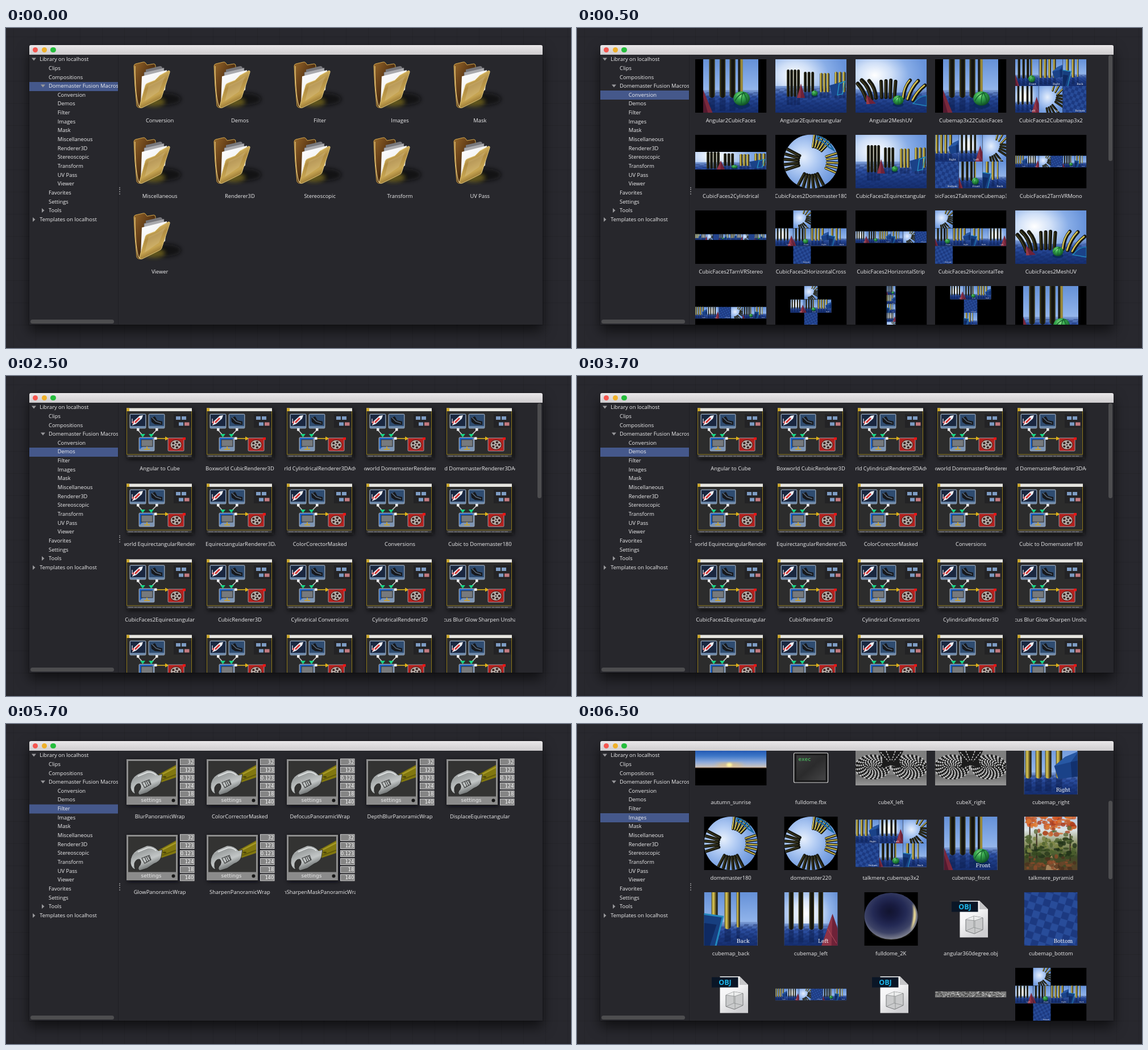
These frames come from a looping animation (994x563 px, 8 s). An HTML page:

```html
<!DOCTYPE html>
<html lang="en">
<head>
<meta charset="utf-8">
<title>Library browser</title>
<style>
html, body { margin: 0; width: 100%; height: 100%; overflow: hidden; background: #28282e; }
#stage {
  position: relative; width: 994px; height: 563px; overflow: hidden;
  font: 9.39px/15.65px "Open Sans", "Noto Sans", sans-serif; color: #efeff0; white-space: nowrap;
  background:
    repeating-linear-gradient(90deg, transparent 0 13px, rgba(0,0,0,.1) 13px 14px, transparent 14px 39px),
    repeating-linear-gradient(transparent 0 15px, rgba(0,0,0,.1) 15px 16px, transparent 16px 39px),
    #28282e;
}
#stage div, #defs, .cell > svg, #side svg { position: absolute; }
#win {
  left: 41px; top: 30px; width: 903px; height: 492px; border-radius: 3px 3px 0 0;
  background: #27272c; box-shadow: 0 11px 22px rgba(0,0,0,.6), 0 0 2px rgba(0,0,0,.6);
}
#bar { left: 0; top: 0; width: 903px; height: 17px; border-radius: 3px 3px 0 0; background: linear-gradient(#e9e7e9, #cfcdcf); }
.dot { top: 3.6px; width: 9.4px; height: 9.4px; border-radius: 50%; }
#side { left: 0; top: 17px; width: 155.5px; height: 475px; overflow: hidden; }
#sel { left: 0; top: 0; width: 156px; height: 15.5px; background: #45588b; animation: pick 8s step-end infinite; }
#split { left: 155.5px; top: 17px; width: 1px; height: 475px; background: #202024; }
#grip { left: 157.5px; top: 250px; width: 0; height: 13px; border-left: 2px dotted #77777a; }
.thumbtrack { background: #4d4d4f; border-radius: 4px; }
.page { left: 157px; top: 17px; width: 746px; height: 475px; overflow: hidden; opacity: 0; }
.cell { width: 125.2px; height: 120px; }
.cell > svg { left: 0; top: 0; overflow: visible; }
.cell div { left: 0; top: 100.6px; width: 125.2px; display: flex; justify-content: center; overflow: hidden; }
@keyframes pick {
  0% { transform: translateY(48px) }
  6.25% { transform: translateY(63px) }
  31.25% { transform: translateY(79px) }
  56.25% { transform: translateY(94.500px) }
  81.25%, 100% { transform: translateY(110px) }
}
@keyframes show0 { 0% { opacity: 1 } 6.25%, 100% { opacity: 0 } }
@keyframes show1 { 0% { opacity: 0 } 6.25% { opacity: 1 } 31.25%, 100% { opacity: 0 } }
@keyframes show2 { 0% { opacity: 0 } 31.25% { opacity: 1 } 56.25%, 100% { opacity: 0 } }
@keyframes show3 { 0% { opacity: 0 } 56.25% { opacity: 1 } 81.25%, 100% { opacity: 0 } }
@keyframes show4 { 0% { opacity: 0 } 81.25%, 100% { opacity: 1 } }
</style>
</head>
<body>
<div id="stage">
  <svg id="defs" width="0" height="0"></svg>
  <div id="win">
    <div id="bar">
      <div class="dot" style="left:5.8px;background:#f5564f"></div>
      <div class="dot" style="left:21.6px;background:#efb02a"></div>
      <div class="dot" style="left:37.3px;background:#25bd3c"></div>
    </div>
    <div id="side"><div id="sel"></div></div>
    <div id="split"></div>
    <div id="grip"></div>
    <div class="thumbtrack" style="left:2px;top:483px;width:147px;height:7px"></div>
  </div>
</div>
<script>
const $ = id => document.getElementById(id);
const rect = (x, y, w, h, fill, more = '') => `<rect x="${x}" y="${y}" width="${w}" height="${h}" fill="${fill}" ${more}/>`;
const path = (d, fill, more = '') => `<path d="${d}" fill="${fill}" ${more}/>`;
const line = (d, color, w, more = '') => path(d, 'none', `stroke="${color}" stroke-width="${w}" ${more}`);
const oval = (x, y, rx, ry, fill, more = '') => `<ellipse cx="${x}" cy="${y}" rx="${rx}" ry="${ry}" fill="${fill}" ${more}/>`;
const word = (x, y, size, fill, text, more = '') => `<text x="${x}" y="${y}" font-size="${size}" fill="${fill}" ${more}>${text}</text>`;
const stops = list => list.split(' ').map((c, i, a) => `<stop offset="${i / (a.length - 1)}" stop-color="${c}"/>`).join('');
const grad = (id, list, x2 = 0, y2 = 1) => `<linearGradient id="${id}" x2="${x2}" y2="${y2}">${stops(list)}</linearGradient>`;
const glow = (id, list, cx, cy, r) => `<radialGradient id="${id}" cx="${cx}" cy="${cy}" r="${r}">${stops(list)}</radialGradient>`;
const symbol = (id, w, h, body) => `<symbol id="${id}" viewBox="0 0 ${w} ${h}" preserveAspectRatio="none">${body}</symbol>`;
const use = (id, x, y, w, h) => `<use href="#${id}" x="${x}" y="${y}" width="${w}" height="${h}"/>`;

let seed = 7;
const rnd = () => (seed = seed * 16807 % 2147483647) / 2147483647;

// Ray-traced scene parts
const pillars = (xs, y, w, h, kind) => xs.map(x => rect(x, y, w, h, `url(#${kind})`, `rx="${w / 2}"`) +
  rect(x, y + h, w, h * .3, '#0d1c48', 'opacity=".45"')).join('');
const sea = (w, y, h) => rect(0, y, w, h - y, 'url(#sea)') + rect(0, y + 4, w, h - y - 4, 'url(#tiles)');
const ball = (x, y, r) => oval(x, y + r * .8, r, r * .45, '#0c2a5c') + oval(x, y, r, r * .9, 'url(#ball)') +
  line(`M${x - r * .8} ${y + r * .3}Q${x - r * .3} ${y - r * .7} ${x + r * .5} ${y - r * .7}M${x} ${y + r * .8}Q${x - r * .1} ${y} ${x + r * .2} ${y - r * .8}M${x + r * .6} ${y + r * .5}Q${x + r * .7} ${y} ${x + r * .2} ${y - r * .8}`, '#14602c', r * .1);
const cone = (x, y, w, h) => path(`M${x} ${y}L${x - w} ${y + h}H${x + w}z`, '#6e2238') + path(`M${x} ${y}L${x - w} ${y + h}H${x - w * .1}z`, '#8e3346');
const post = (d, w, lit) => line(d, '#17170f', w, 'stroke-linecap="round"') + line(d, lit ? '#d3c052' : '#4d4926', w * (lit ? .42 : .22), `stroke-linecap="round" transform="translate(${-w * .2} 0)"`);
const fan = (cx, cy, outer, inner, from, to, n, w, lit) => Array.from({ length: n }, (_, i) => {
  const a = (from + (to - from) * i / (n - 1)) * Math.PI / 180, c = Math.cos(a), s = Math.sin(a);
  return post(`M${cx + outer * c} ${cy + outer * s}L${cx + inner * c} ${cy + inner * s}`, w, lit);
}).join('');

const scenes =
  symbol('Front', 94, 94, rect(0, 0, 94, 94, 'url(#sky)') + sea(94, 54, 94) +
    pillars([10, 28, 45], -8, 10, 76, 'dark') + pillars([59.500], -8, 8, 74, 'edge') +
    path('M0 54L16 94H0z', '#7a283c') + path('M0 66L8 94H0z', '#531a2f') + ball(65.500, 69, 14)) +
  symbol('Left', 94, 94, rect(0, 0, 94, 94, 'url(#haze)') + sea(94, 55, 94) +
    pillars([8, 25, 44, 60], -8, 8.500, 74, 'dark') + cone(85, 38, 20, 58) + line('M76 64L92 90', '#b2505f', 1)) +
  symbol('Back', 94, 94, rect(0, 0, 94, 94, 'url(#sky)') + sea(94, 52, 94) +
    pillars([13, 36], -8, 11, 73, 'lit') + pillars([57], -8, 6, 70, 'lit') + path('M-2 38L33 43L20 96H-2z', '#173f80', 'stroke="#2389bd" stroke-width="3"') + path('M0 54L22 57L10 94H0z', '#0f2a62')) +
  symbol('Right', 94, 94, rect(0, 0, 94, 94, 'url(#sky)') + sea(94, 55, 94) +
    pillars([2, 20, 37, 56], -8, 11, 74, 'lit') + path('M53 44L72 28L96 18V62L60 67z', '#1a4288') + path('M53 44L82 37L96 18L72 28z', '#2758a4') + path('M82 37L96 34V62L84 64z', '#12316e')) +
  symbol('Top', 94, 94, rect(0, 0, 94, 94, 'url(#zenith)') + fan(20, 30, 95, 52, 4, 30, 4, 8, 0) + fan(20, 30, 95, 50, 48, 78, 4, 8, 0) + fan(40, 60, 85, 46, -72, -42, 3, 7, 1)) +
  symbol('Bottom', 94, 94, rect(0, 0, 94, 94, '#1c3980') + rect(0, 0, 94, 94, 'url(#floor)')) +
  symbol('Pano', 125, 94, rect(0, 0, 125, 94, 'url(#haze2)') + sea(125, 47, 94) +
    pillars([20, 26, 32, 38], 18, 5, 48, 'dark') + pillars([50, 56.5, 63], 22, 5, 36, 'dark') +
    pillars([78, 84, 90], 24, 5, 34, 'lit') + pillars([104, 111, 118], 22, 5.5, 36, 'lit') +
    cone(45, 43, 7, 25) + ball(69, 60, 5.5) + path('M95 46L119 39L117 60L100 65z', '#1a4288') + line('M112 43L122 39L118 61L109 63z', '#2292c2', 1.5)) +
  symbol('Mesh', 125, 94, rect(0, 0, 125, 94, 'url(#haze2)') + path('M0 52Q62 66 125 52V94H0z', 'url(#sea)') + path('M0 58Q62 72 125 58V94H0z', 'url(#tiles)') +
    post('M20 72Q14 54 4 43', 7) + post('M28 70Q24 48 11 37', 7) + post('M36 68Q35 50 24 38', 6.500) +
    [46, 53.500, 61, 68.500].map((x, i) => post(`M${x} 67L${x - 1 + i} ${39 - i % 3}`, 6)).join('') +
    post('M84 68Q86 48 96 37', 6, 1) + post('M92 70Q98 50 110 38', 6.500, 1) + post('M101 72Q109 56 122 46', 6.500, 1) +
    path('M19 62L36 78L19 79z', '#6e2238') + path('M19 62L25 79H19z', '#963a48') + ball(75, 72, 9.5) + path('M101 78Q112 64 125 64V82z', '#1a4288', 'stroke="#2285b8" stroke-width="1.5"')) +
  symbol('Dome', 94, 94, `<g clip-path="url(#disc)">` + rect(0, 0, 94, 94, 'url(#zenith)') +
    fan(47, 47, 50, 22, 162, 208, 5, 5.4, 0) + fan(47, 47, 50, 26, -82, -46, 5, 4.8, 1) +
    fan(47, 47, 50, 28, -18, 24, 5, 4.6, 1) + fan(47, 47, 50, 24, 62, 118, 6, 5.4, 0) +
    line('M58 2Q78 10 86 27L78 22Q70 12 58 8z', '#1d6aa2', 2.5) + '</g>');

const names = { F: 'Front', L: 'Left', B: 'Back', R: 'Right', T: 'Top', D: 'Bottom' };
const face = (k, x, y, w, h, tag = 1) => use(names[k], x, y, w, h) +
  (tag ? word(x + w * .73, y + h * .95, h * .097, '#fff', names[k], 'text-anchor="middle" font-family="DejaVu Serif, serif"') : '');
const lay = (map, x, y, w, h, tag) => map.split('/').map((row, j) =>
  [...row].map((k, i) => k === '.' ? '' : face(k, x + i * w, y + j * h, w, h, tag)).join('')).join('');
const black = rect(0, 0, 125.2, 94, '#000');
const whole = id => () => use(id, 0, 0, 125.2, 94);
const crop = (id, y, h) => `<svg x="0" y="${y}" width="125.2" height="${h}" viewBox="0 18 125 50" preserveAspectRatio="none">${use(id, 0, 0, 125, 94)}</svg>`;
const square = k => () => face(k, 15.6, 0, 94, 94);
const onBlack = body => () => black + body;
const flatFront = onBlack(face('F', 14, 0, 97, 94, 0));
const cross = lay('.T../LFRB/.D..', 0, 0, 31.3, 31.3);
const strip = map => lay(map, 0, 36.5, 20.87, 20.87);

const folder = () => oval(72, 70, 28, 11, '#0c0c0e', 'filter="url(#soft)" opacity=".75"') +
  oval(52, 75, 20, 8, '#75661f', 'filter="url(#soft)" opacity=".8"') +
  path('M17 12Q17 9 20 8L33 5Q36 4 38 7L40 10L52 8Q55 8 55 12V34L33 83Q25 88 22 82Q18 45 17 12z', 'url(#cover)', 'stroke="#d3a850" stroke-width="1"') +
  path('M38 18L63 12Q67 12 67 16V44L38 62z', '#77777c') + path('M35 23L70 15V46L35 66z', '#a9a9ad', 'stroke="#626268" stroke-width=".6"') +
  path('M31 30L75 19L72 54L29 78z', 'url(#sheet)') +
  path('M37 46Q38 43 41 42L54 37L60 31Q62 28 65 27L78 20Q81 20 80 23L66 66Q65 69 62 70L32 85Q26 87 27 82z', 'url(#gold)', 'stroke="#e8cf80" stroke-width=".9"') +
  path('M43 46L60 38L72 30L61 57L36 74z', '#fff', 'opacity=".13"') + line('M19 12C19 40 21 68 25 82L28 84', '#f0d58a', 1.1);

const chip = (x, y, w, h, fill) => rect(x, y, w, h, fill, 'rx="1.5" stroke="#a9b7c8" stroke-width=".8"');
const graph = () => rect(6, 5, 116, 86, '#0b0b0d', 'filter="url(#soft)"') + rect(4, 2, 115, 86, '#2c2c2c') +
  line('M4.5 5V83H118.5V5', '#8f7a1c', 1) + rect(4, 1.5, 115, 5.5, '#e6e5e0') + rect(4, 1.5, 5, 5.5, '#cda92c') +
  rect(5, 84, 113, 4, '#3b3b3e') + line('M7 86H112', '#8e8e92', 1, 'stroke-dasharray="9 1.5 5 1"') +
  rect(87, 12, 31, 24, '#232325') +
  [[91, 16], [101, 16], [96, 26.5]].map(p => rect(...p, 8, 6, '#7d9bc2')).join('') + rect(106, 26.5, 8.5, 6, '#c37a80') +
  line('M24 40L33 50M57 40L47 50', '#c9c9c9', 1.7) +
  chip(10, 12, 28, 25, '#6b87a8') + rect(11, 13, 26, 20, '#1a2740') +
  path('M14 32L17 24L27 15L33 14L31 20L21 29z', '#eceff4') + line('M19 27L27 19', '#d43434', 3) + path('M17 24L13 26L16 30z', '#d43434') + line('M14 20V28', '#e9eef6', 1.2) +
  chip(43, 12, 28, 25, '#6b87a8') + rect(44, 13, 26, 20, '#2f4c70') + path('M47 19L54 16L58 23L67 25V31L54 30L48 26z', '#16181c') + line('M49 18L56 25L65 28', '#5d6b7c', 1.5) +
  [[22, 37], [55, 37]].map(p => rect(...p, 4.5, 4.5, '#f1f1f1')).join('') +
  path('M28 47H37L32.500 53z', '#17d686') + path('M43 47H52L47.500 53z', '#17d686') +
  chip(26, 53, 27, 24, '#7f96b4') + path('M27 54H52L27 74z', '#1d62c6') + rect(30, 57, 20, 12, '#777a7d', 'stroke="#2a2c2f"') + line('M40 69V74M35 74H45', '#c3a13c', 2) +
  line('M56 55H73', '#d8b223', 1.6) + path('M72 51.500L79 55L72 58.500z', '#e0b117') + rect(53, 52.500, 4.500, 4.500, '#f1f1f1') +
  chip(77, 54, 28, 23, '#b5211e') + oval(91, 66, 10, 8.500, '#b5aaa5', 'stroke="#4a1511"') +
  Array.from({ length: 5 }, (_, i) => oval(91 + 5.8 * Math.cos(i * 1.2566), 66 + 4.8 * Math.sin(i * 1.2566), 2.1, 1.9, '#33201e')).join('') +
  oval(91, 66, 1.2, 1.2, '#222') + rect(103, 53, 5, 4.500, '#ec1616');

const wrench = () => rect(6, 9, 90, 80, '#111113', 'filter="url(#soft)"') + rect(5.500, 8.500, 87, 77, '#333332', 'stroke="#8d8d8d" stroke-width="3"') +
  path('M60 34L91 17V39L64 48z', '#81770f') + line('M66 34L91 21', '#a89b28', 2.5) + line('M67 43L91 34', '#5d560c', 1.5) + oval(71, 38, 3, 1.5, '#4b450c') +
  path('M11 57Q10 41 24 33L40 26Q52 25 60 35L67 33L65 46Q63 54 52 58L40 66L27 70Q22 66 28 60Q31 54 27 50Q21 49 18 57Q17 64 20 68Q13 67 11 57z', 'url(#steel)', 'stroke="#1d1d1d" stroke-width=".8"') +
  line('M31 48L44 43L47 51L36 57z', '#454747', 1.3) + line('M36 46L40 55M39 45L43 53M42 44L46 51', '#353737', 1.2) + line('M24 37L41 30Q50 29 56 35', '#e9ecec', 1.5) +
  rect(5, 72.500, 88, 13, '#8b8b8b') + word(47.500, 82, 9, '#e9e9e9', 'settings', 'text-anchor="middle" font-family="DejaVu Sans, sans-serif"') +
  oval(86.500, 79.500, 3, 3, '#161616') +
  ['32', '123', '0.123', '124', '18', '140'].map((t, i) => {
    const y = 6.3 + i * 14.1;
    return rect(98.500, y, 24.500, 11, '#858585', 'stroke="#cfcfcf"') + word(122, y + 8.500, 8, '#fff', t, 'text-anchor="end" font-family="DejaVu Sans, sans-serif"');
  }).join('');

const sunrise = () => rect(0, 15.6, 125.2, 62.4, '#000') + rect(0, 15.6, 125.2, 32.2, 'url(#dawn)') +
  oval(60, 42, 24, 3, '#f6bf5c', 'filter="url(#soft)" opacity=".8"') + oval(60, 42, 5, 3.500, '#fff6a0', 'filter="url(#haloblur)"') +
  rect(0, 47, 125.2, 31, '#000') + rect(0, 46.500, 125.2, 1.2, '#5c4030');
const exec = () => rect(32.500, 21, 60, 52, '#1a1a1b', 'rx="2" stroke="#d6d6d6" stroke-width="1.2"') + rect(37, 25, 51.500, 44, 'url(#panel)') +
  word(40.500, 34.500, 9.2, '#4fd667', 'exec', 'font-family="DejaVu Sans Mono, monospace"');
const lobe = (x, y) => Array.from({ length: 9 }, (_, i) => oval(x, y, 3 + i * 3.5, 1.5 + i * 2.4, 'none',
  `stroke="#c4c4c4" stroke-width="2.4" stroke-dasharray="${1.4 + i * .3}" stroke-dashoffset="${i % 2 * (1.4 + i * .3)}"`)).join('');
const cubeX = () => `<svg y="15.6" width="125.2" height="62.4">` + rect(0, 0, 125.2, 62.4, '#7f7f7f') + rect(0, 44, 125.2, 19, 'url(#fade)') +
  oval(30, 30, 31, 22, '#1c1c1c') + oval(95, 30, 31, 22, '#1c1c1c') + lobe(30, 30) + lobe(95, 30) +
  path('M40 0H85L76 18L82 32L62 27L44 32L49 18z', '#1c1c1c') + line('M44 4L58 20M54 2L61 18M80 4L67 20M70 2L64 18', '#c4c4c4', 1.6, 'stroke-dasharray="3 2"') + '</svg>';
const dusk = () => rect(15.6, 0, 94, 94, '#000') + line('M30 72Q62 92 95 72', '#6d6652', 1.2, 'filter="url(#haloblur)"') +
  oval(62.600, 42, 47, 41, 'url(#night)') + path('M101 20Q114 42 97 68Q104 42 101 20z', '#f8e59a', 'filter="url(#haloblur)"');
const obj = () => path('M43.500 15H78L93 30V79.500H43.500z', 'url(#sheet)') + path('M78 15L93 30H78z', '#c6c6c8') +
  path('M54 48L68 42L84 45V66L69 73L54 68z', '#c9cacb', 'stroke="#77797b" stroke-width="1"') + path('M54 48L68 42L84 45L70 50z', '#eceded') + line('M54 48L70 50L84 45M70 50V73M68 42V62L54 68M68 62L84 66', '#8b8d8f', .8) +
  rect(29, 16.500, 46.500, 18, '#0a1626') + word(52.500, 30, 12.5, '#1cb8ec', 'OBJ', 'text-anchor="middle" font-weight="700" font-family="Open Sans, sans-serif"');
const noise = () => rect(0, 41.500, 125.2, 10.400, '#7c7c7c') + Array.from({ length: 200 }, () =>
  rect(rnd() * 123, 41.500 + rnd() * 9, 1 + rnd() * 1.5, 1.2, rnd() < .5 ? '#303030' : '#c8c8c8')).join('');

const leaves = (n, y, h, colors) => Array.from({ length: n }, () =>
  oval(4 + rnd() * 86, y + rnd() * h, 2 + rnd() * 4, 1.5 + rnd() * 3, colors[rnd() * colors.length | 0], 'opacity=".8"')).join('');
const autumn = () => `<svg x="15.6" width="94" height="94">` + rect(0, 0, 94, 94, 'url(#grove)') +
  line('M10 10V80M22 30V74M81 30V78', '#3a2b20', 2) + leaves(95, 36, 34, ['#4f6330', '#33461f', '#7b8442', '#22331a']) +
  path('M38 94Q40 76 49 68Q52 80 62 94z', '#a4825a') + leaves(55, 70, 24, ['#6b452a', '#3a4a26', '#8c4a2a', '#4c331f']) +
  leaves(85, -2, 22, ['#d65a25', '#e07a30', '#a83a1d', '#c05c30']) + leaves(18, 18, 14, ['#d06a30', '#a84522', '#5d6a38']) + '</svg>';

$('defs').innerHTML = '<defs>' +
  grad('sky', '#6591d8 #8db1e9 #c3d6f4') + glow('haze', '#ffffff #dbe7fa #8fb2e8 #6690d6', .4, .4, .7) +
  glow('haze2', '#ffffff #cfdff7 #88ade7 #6893da', .27, .3, .72) + glow('zenith', '#e6effc #b4cdf4 #86abe6 #6490d8', .36, .42, .7) +
  grad('sea', '#7f9fd6 #2d50a2 #1c3a82 #162f70') +
  grad('dark', '#57532a #1f1f17 #14140f #14140f #45411f', 1, 0) + grad('edge', '#14140f #1f1f17 #a8963c #8a7a30', 1, 0) +
  grad('lit', '#4e461c #dccb58 #a8933a #37331a #16160f', 1, 0) +
  glow('ball', '#8fe08c #3aac50 #217a38 #0b4020', .4, .3, .75) + grad('cover', '#96682a #6a431a #3d240e #8a6024', 1, 1) +
  grad('sheet', '#ffffff #f4f4f5 #cfcfd2', .6, 1) + grad('gold', '#8b6529 #dbbd6b #b08c42 #c7a552 #7c5c22', .4, 1) +
  grad('steel', '#e2e5e5 #9da1a1 #c3c7c7 #5a5e5e', .5, 1) + grad('dawn', '#1f55b0 #3f78c8 #8daadb #dccbb8') +
  grad('panel', '#3a3a3b #2b2b2c #454546', 1, 1) + grad('fade', '#6a6a6a #989898') +
  glow('night', '#12142f #181b40 #242a55 #3c4266 #888a95', .47, .4, .62) +
  grad('grove', '#b9cbe4 #dde4e6 #8f9668 #3f4d28 #5a4228') +
  '<pattern id="tiles" width="16" height="8" patternUnits="userSpaceOnUse" patternTransform="skewX(-24)"><path d="M0 0H8V4H16V8H8V4H0z" fill="#10265f" opacity=".35"/></pattern>' +
  '<pattern id="floor" width="25" height="25" patternUnits="userSpaceOnUse" patternTransform="rotate(17)"><path d="M0 0H12.5V25H25V12.5H0z" fill="#3058aa" opacity=".6"/></pattern>' +
  '<filter id="soft" x="-50%" y="-50%" width="200%" height="200%"><feGaussianBlur stdDeviation="3.5"/></filter>' +
  '<filter id="haloblur" x="-1" y="-1" width="3" height="3"><feGaussianBlur stdDeviation="1.8"/></filter>' +
  '<clipPath id="disc"><circle cx="47" cy="47" r="47"/></clipPath>' + scenes + '</defs>';

const same = (labels, art) => labels.map(t => [t, art]);
const dome = () => rect(15.6, 0, 94, 94, '#000') + use('Dome', 15.6, 0, 94, 94);
const pages = [
  { cells: same(['Conversion', 'Demos', 'Filter', 'Images', 'Mask', 'Miscellaneous', 'Renderer3D', 'Stereoscopic', 'Transform', 'UV Pass', 'Viewer'], folder) },
  { bar: [48, 186], cells: [
    ['Angular2CubicFaces', flatFront], ['Angular2Equirectangular', whole('Pano')], ['Angular2MeshUV', whole('Mesh')],
    ['Cubemap3x22CubicFaces', flatFront], ['CubicFaces2Cubemap3x2', () => lay('FRB/LTD', 0, 0, 41.73, 47)],
    ['CubicFaces2Cylindrical', onBlack(crop('Pano', 30, 31))], ['CubicFaces2Domemaster180', onBlack(use('Dome', 14.6, -.500, 96, 95))],
    ['CubicFaces2Equirectangular', whole('Pano')], ['CubicFaces2TalkmereCubemap3x2', () => lay('RLT/DFB', 0, 0, 41.73, 47)],
    ['CubicFaces2TarnVRMono', onBlack(strip('RLTDFB'))],
    ['CubicFaces2TarnVRStereo', onBlack(lay('RLTDFBRLTDFB', 0, 41.500, 10.43, 10.43, 0))], ['CubicFaces2HorizontalCross', onBlack(cross)],
    ['CubicFaces2HorizontalStrip', onBlack(strip('LFRBTD'))], ['CubicFaces2HorizontalTee', onBlack(lay('T.../FRBL/D...', 0, 0, 31.3, 31.3))],
    ['CubicFaces2MeshUV', whole('Mesh')],
    ['', onBlack(strip('RLDTFB'))], ['', onBlack(lay('.T./LFR/.D./.B.', 26.500, 0, 24, 23.500))],
    ['', onBlack(lay('F/R/B/L/T/D', 54.800, 0, 15.7, 15.7))], ['', onBlack(lay('LFR/.D./.B./.T.', 26.500, 0, 24, 23.500))], ['', flatFront]] },
  { bar: [48, 167], cells: same(['Angular to Cube', 'Boxworld CubicRenderer3D', 'Boxworld CylindricalRenderer3DAdvanced', 'Boxworld DomemasterRenderer3D',
    'Boxworld DomemasterRenderer3DAdvanced', 'Boxworld EquirectangularRenderer3D', 'Boxworld EquirectangularRenderer3DAdvanced', 'ColorCorectorMasked', 'Conversions', 'Cubic to Domemaster180',
    'CubicFaces2Equirectangular', 'CubicRenderer3D', 'Cylindrical Conversions', 'CylindricalRenderer3D', 'Defocus Blur Glow Sharpen Unsharpen', '', '', '', '', ''], graph) },
  { cells: same(['BlurPanoramicWrap', 'ColorCorrectorMasked', 'DefocusPanoramicWrap', 'DepthBlurPanoramicWrap', 'DisplaceEquirectangular',
    'GlowPanoramicWrap', 'SharpenPanoramicWrap', 'UnSharpenMaskPanoramicWrap'], wrench) },
  { top: -25, bar: [135, 138], cells: [
    ['autumn_sunrise', sunrise], ['fulldome.fbx', exec], ['cubeX_left', cubeX], ['cubeX_right', cubeX], ['cubemap_right', square('R')],
    ['domemaster180', dome], ['domemaster220', dome], ['talkmere_cubemap3x2', () => lay('RLT/DFB', 0, 5.2, 41.73, 41.73)], ['cubemap_front', square('F')], ['talkmere_pyramid', autumn],
    ['cubemap_back', square('B')], ['cubemap_left', square('L')], ['fulldome_2K', dusk], ['angular360degree.obj', obj], ['cubemap_bottom', square('D')],
    ['', obj], ['', () => strip('RLTDFB')], ['', obj], ['', noise], ['', onBlack(cross)]] }
];

const pageHtml = ({ top = 0, bar, cells }, n) => `<div class="page" style="animation:show${n} 8s step-end infinite">` +
  cells.map(([label, art], i) => `<div class="cell" style="left:${10 + i % 5 * 140.8}px;top:${7.5 + top + (i / 5 | 0) * 133}px"><svg width="125.2" height="94">${art()}</svg><div>${label}</div></div>`).join('') +
  (bar ? `<div class="thumbtrack" style="left:737px;top:${bar[0] - 47}px;width:7px;height:${bar[1]}px"></div>` : '') + '</div>';
$('win').insertAdjacentHTML('beforeend', pages.map(pageHtml).join(''));

// Tree rows: indent level, optional arrow (v open, > closed), label
const tree = ['0vLibrary on localhost', '1 Clips', '1 Compositions', '1vDomemaster Fusion Macros',
  ...pages[0].cells.map(c => '2 ' + c[0]), '1 Favorites', '1 Settings', '1>Tools', '0>Templates on localhost'];
const arrows = { v: 'M0 1.500H8L4 6.500z', '>': 'M2 0V8L6.500 4z' };
$('side').insertAdjacentHTML('beforeend', tree.map((row, i) => {
  const x = 18.3 + row[0] * 15.7, y = .2 + i * 15.65, arrow = arrows[row[1]];
  return `<div style="left:${x}px;top:${y}px">${row.slice(2)}</div>` +
    (arrow ? `<svg style="left:${x - 14.5}px;top:${y + 4}px" width="8" height="8">${path(arrow, '#98989b')}</svg>` : '');
}).join(''));
</script>
</body>
</html>
```
